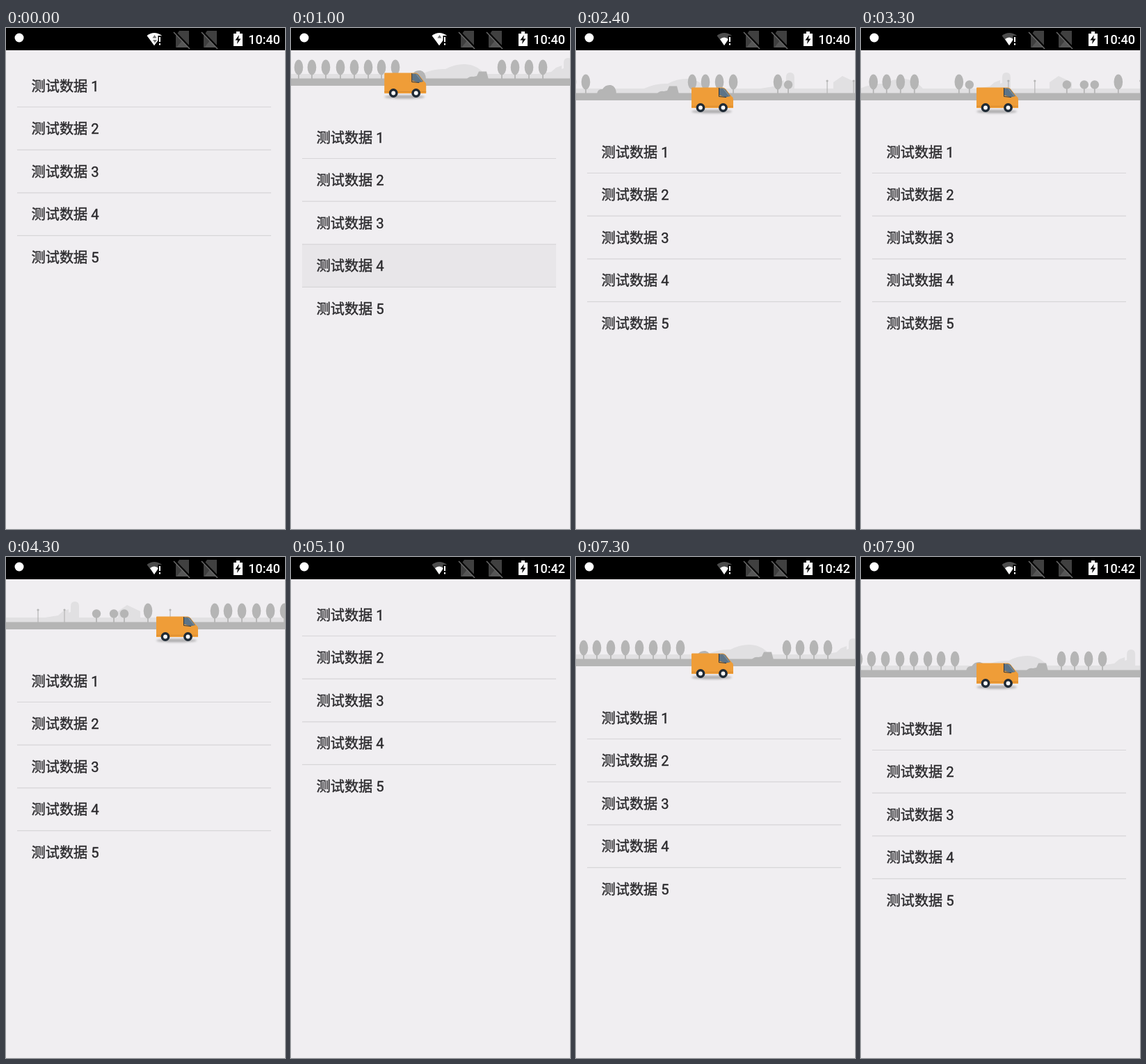
These frames come from a looping animation (401 by 720 pixels, 8 s). An HTML page:

```html
<!DOCTYPE html>
<html lang="zh-CN">
<head>
<meta charset="utf-8">
<title>Pull to refresh</title>
<style>
  html, body { margin: 0; width: 100%; height: 100%; overflow: hidden; background: #f0eef1; }
  svg { display: block; width: 401px; height: 720px; }
  text { font: 400 20.2px Roboto, "Noto Sans CJK SC", "Noto Sans CJK", sans-serif; fill: #2b2a2d; }
  #list text { stroke: #2b2a2d; stroke-width: .4px; }
  #clock { font-size: 18px; font-weight: 500; fill: #fff; }
</style>
</head>
<body>
<svg viewBox="0 0 401 720">
  <defs>
    <filter id="blur" x="-20%" y="-100%" width="140%" height="300%"><feGaussianBlur stdDeviation="1.4"/></filter>
    <g id="sim">
      <path d="M6 4H20V28H1V11Z" fill="#404040"/>
      <path d="M2 28L11 17L20 27V28Z" fill="#565656"/>
      <path d="M-1 5L22 29" stroke="#000" stroke-width="3"/>
      <path d="M-2 6L21 30" stroke="#686868" stroke-width="1.5"/>
    </g>
    <g id="wheel">
      <circle r="6.4" fill="#1f2a35"/>
      <circle r="2.9" fill="#fff"/>
    </g>
    <g id="hills" fill="#e1e0e2">
      <path d="M188-8Q205-16 222-15Q235-22 249-22Q266-22 278-8Z"/>
      <path d="M355-8L374-11L381-17L389-20V-15L392-16V-24Q392-31 398-31Q404-31 404-24V-8Z"/>
      <path d="M460-8V-17L473-26L492-17V-8Z"/>
    </g>
    <g id="near"></g>
  </defs>

  <rect width="401" height="720" fill="#f0eef1"/>
  <g id="header">
    <rect y="-8" width="401" height="8" fill="#e1e0e2"/>
    <g id="far"><use href="#hills"/><use href="#hills" x="740"/></g>
    <g id="road"><use href="#near"/><use href="#near" x="740"/></g>
    <rect y="-1.5" width="401" height="10.5" fill="#b5b5b5"/>
    <g id="van">
      <ellipse cx="30" cy="24.5" rx="29" ry="2.6" fill="#777" opacity=".55" filter="url(#blur)"/>
      <path d="M2-10H46Q48-10 50-8L58 2Q61 4 61 7V19.500H1V-9Q1-10 2-10Z" fill="#ef9d38"/>
      <path d="M41-9H46Q48-9 50-7L57 2.500L50 4L41 1Z" fill="#5d7487"/>
      <path d="M40.500-9.500V3L51 4" fill="none" stroke="#2c3743"/>
      <path d="M47-8L55 2" stroke="#8799a7"/>
      <path d="M1 17H61" stroke="#d98a2c"/>
      <use href="#wheel" x="14" y="19"/>
      <use href="#wheel" x="46.500" y="19"/>
    </g>
  </g>
  <g id="list"></g>

  <rect width="401" height="32" fill="#000"/>
  <circle cx="19" cy="14" r="6.5" fill="#fff"/>
  <path id="fan" d="M202.500 11Q213 3 224 11L213 25Z" fill="#fff"/>
  <path d="M207 16Q213 11 219 16L213 25Z" fill="#fff"/>
  <path id="up" d="M210.500 14.500L213.500 10L216.500 14.500Z" fill="#777"/>
  <path id="down" d="M211 17L217 17L214 21.500Z" fill="#777"/>
  <path d="M221 11V26" stroke="#000" stroke-width="5"/>
  <path d="M221 13V20M221 22V24.500" stroke="#fff" stroke-width="2"/>
  <use href="#sim" x="243"/>
  <use href="#sim" x="283"/>
  <path d="M327 8H331V5H336V8H340V26H327Z" fill="#fff"/>
  <path d="M335 10L329.500 17.500H333L332 23L337.500 15.500H334Z" fill="#000"/>
  <text id="clock" x="348.200" y="23">10:40</text>
</svg>
<script>
const $ = id => document.getElementById(id);
const GREY = '#b5b5b5';
const LOOP = 8000, STEP = 100, REST = 95;

const trunk = (x, top, w) =>
  `<path d="M${x} ${top}V0" stroke="${GREY}" stroke-width="${w}"/>`;
const tall = x =>
  trunk(x, -17, 1.8) + `<ellipse cx="${x}" cy="-17.5" rx="6.3" ry="11" fill="${GREY}"/>`;
const small = x =>
  trunk(x, -13, 1.8) + `<circle cx="${x}" cy="-13.5" r="6.2" fill="${GREY}"/>`;
const lamp = x =>
  trunk(x, -19, 1.2) + `<circle cx="${x}" cy="-19" r="1.6" fill="${GREY}"/>`;

$('near').innerHTML =
  [11, 30, 50, 71, 91, 111, 130, 150, 303, 322, 342, 362, 426, 655].map(tall).join('') +
  [441, 581, 606, 621].map(small).join('') +
  [497, 535, 687].map(lamp).join('') +
  `<path d="M166 0Q167-8 174-7Q178-14 186-13Q194-11 194 0Z" fill="${GREY}"/>
   <path d="M252 0Q256-5 262-4L267-5L270-11.500H281L284 0Z" fill="${GREY}"/>`;

let rows = '<rect id="press" x="16" y="237" width="365" height="62" fill="#e8e6e9"/>';
for (let i = 0; i < 5; i++) {
  const y = 61.65 * i;
  rows += `<text x="36.500" y="${90.5 + y}">测试数据 ${i + 1}</text>`;
  if (i < 4) rows += `<path d="M16 ${113.5 + y}H381" stroke="#d7d5d8" stroke-width="1.2"/>`;
}
$('list').innerHTML = rows;

// [time, list offset, ease out into this key]
const pull = [
  [0, 0], [640, 0], [1000, 74], [1500, 163], [1578, 174], [2078, REST, 1],
  [4300, REST], [4750, 0, 1], [6040, 0], [6600, 72], [6900, 97],
  [7600, 187], [7833, 187], [8333, REST, 1]
];

function offsetAt(t) {
  const i = pull.findIndex(k => k[0] > t);
  const [t0, a] = pull[i - 1], [t1, b, ease] = pull[i];
  const p = (t - t0) / (t1 - t0);
  return Math.round(a + (b - a) * (ease ? 1 - (1 - p) ** 2 : p));
}

const move = (id, x, y) => $(id).setAttribute('transform', `translate(${x.toFixed(2)} ${y.toFixed(2)})`);
const show = (id, on) => $(id).setAttribute('visibility', on ? 'visible' : 'hidden');

function draw(t) {
  const y = offsetAt(t);
  const released = t >= 7810 ? 7810 : t >= 1580 && t < 5000 ? 1580 : t;
  const ran = (t - released) * 0.1658;
  const leave = t > 4200 && t < 5000 ? (t - 4200) * 0.5 : 0;
  const lift = y > REST && ran > 0 ? 2 : 0;

  move('header', 0, y);
  move('list', 0, y);
  move('road', -(ran % 740), 0);
  move('far', -(ran * 0.663 % 740), 0);
  move('van', (leave ? 165 : Math.min(165, y * 1.8)) + leave, 0.5 - lift);
  show('header', y > 0);
  show('press', t >= 800 && t <= 1100);

  const strong = t < 2000;
  $('fan').setAttribute('fill', strong ? '#fff' : '#4c4c4c');
  show('up', strong);
  show('down', t < 300);
  $('clock').textContent = t < 4900 ? '10:40' : '10:42';
}

const start = performance.now();
function tick() {
  const t = (performance.now() - start) % LOOP;
  draw(Math.floor(t / STEP) * STEP);
  requestAnimationFrame(tick);
}
tick();
</script>
</body>
</html>
```
